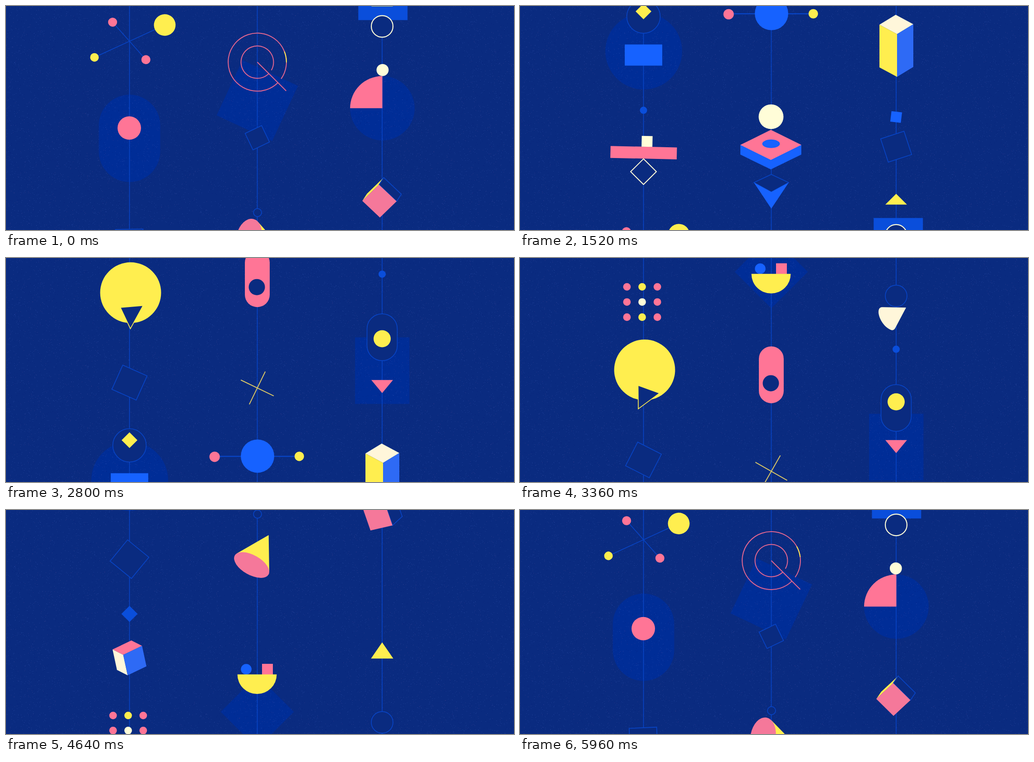
Animation of 1125 by 498 pixels, one loop 6000 ms. Source, as an HTML page with a canvas:

```html
<!DOCTYPE html>
<html lang="en">
<head>
<meta charset="utf-8">
<title>Drifting shapes</title>
<style>
html, body { margin: 0; width: 100%; height: 100%; overflow: hidden; background: #0a2b80; }
svg, canvas { position: absolute; left: 0; top: 0; width: 100%; height: 100%; display: block; }
</style>
</head>
<body>
<svg id="back" viewBox="0 0 1125 498"></svg>
<canvas id="grain" width="1125" height="498"></canvas>
<svg id="front" viewBox="0 0 1125 498"></svg>
<script>
const LOOP = 6000, V = 0.307;
const L = 273.5, M = 556.5, R = 833;
const BG = '#0a2b80', DEEP = '#002d97', WIRE = '#0844c4', MID = '#0a4edb', BLUE = '#1662ff';
const PINK = '#ff7596', YELLOW = '#ffee4f', CREAM = '#fffdd8', IVORY = '#fff6da', ROSE = '#e4668f';
const back = document.getElementById('back'), front = document.getElementById('front');
const items = [];

const clamp = (x, a = 0, b = 1) => Math.min(b, Math.max(a, x));
const mix = (a, b, u) => a.map((p, i) => p + (b[i] - p) * u);
const wave = (d, half) => Math.cos(Math.PI * d / half);
const ease = p => p < 0.5 ? 2 * p * p : 1 - 2 * (1 - p) * (1 - p);
const rad = a => a * Math.PI / 180;

// Markup helpers
const paint = (fill, stroke, w = 1.7) =>
  `fill="${fill}"` + (stroke ? ` stroke="${stroke}" stroke-width="${w}"` : '');
const disc = (x, y, r, fill, stroke, w) => `<circle cx="${x}" cy="${y}" r="${r}" ${paint(fill, stroke, w)}/>`;
const box = (x, y, w, h, fill, stroke, rx = 0) =>
  `<rect x="${x}" y="${y}" width="${w}" height="${h}" rx="${rx}" ${paint(fill, stroke)}/>`;
const square = (s, fill, stroke) => box(-s / 2, -s / 2, s, s, fill, stroke);
const poly = (pts, fill, stroke, w) => `<polygon points="${pts}" ${paint(fill, stroke, w)}/>`;
const diamond = (h, fill, stroke, w) => poly(`0,${-h} ${h},0 0,${h} ${-h},0`, fill, stroke, w);
const path = (d, fill = 'none', stroke, w) => `<path d="${d}" ${paint(fill, stroke, w)}/>`;
const arc = (r, a, b) => {
  const p = q => `${(r * Math.cos(rad(q))).toFixed(2)} ${(r * Math.sin(rad(q))).toFixed(2)}`;
  return `M${p(a)}A${r} ${r} 0 ${b - a > 180 ? 1 : 0} 1 ${p(b)}`;
};

// An item sits at height y at time t and drifts down at speed v.
// pose(kids, d) changes its parts, d being the time since t.
function add(layer, x, t, y, v, html, { rot = 0, spin = 0, pose } = {}) {
  const el = document.createElementNS('http://www.w3.org/2000/svg', 'g');
  el.innerHTML = html;
  layer.append(el);
  items.push({ el, x, t, y, v, rot, spin, pose, kids: [...el.children] });
}

// A solid from three edges leaving its near corner: [x, ax, ay, bx, by, cx, cy]
function solid(t, y, v, from, to, span, fills, wire) {
  const html = fills.map((f, i) => poly('', f, i === wire ? WIRE : '')).join('');
  add(front, 0, t, y, v, html, { pose(kids, d) {
    const [x, ax, ay, bx, by, cx, cy] = mix(from, to, clamp(d / span, -0.3, 1.3));
    const face = (px, py, qx, qy) => `${x},0 ${x + px},${py} ${x + px + qx},${py + qy} ${x + qx},${qy}`;
    kids[0].setAttribute('points', face(ax, ay, cx, cy));
    kids[1].setAttribute('points', face(bx, by, cx, cy));
    kids[2].setAttribute('points', face(ax, ay, bx, by));
  } });
}

// Deep shapes behind the strings
add(back, L, 0, 294, d => d * (d < 0 ? 0.286 : 0.305), box(-68, -97, 136, 194, DEEP, '', 68));
add(back, L, 2200, 309, V, disc(0.5, 0, 85, DEEP));
add(back, M, 0, 210, 0.315, square(135.6, DEEP), { rot: 25, spin: -0.0105 });
add(back, M, 3360, 30.5, 0.3265, diamond(81, DEEP));
add(back, R, 0, 227, 0.3125, disc(0.5, 0, 71.5, DEEP));
add(back, R, 2200, 68, 0.3035, box(-60, -74, 120.5, 148, DEEP));
back.insertAdjacentHTML('beforeend', [L, M, R].map(x => path(`M${x} 0V498`, 'none', WIRE)).join(''));

// Left string
add(front, L, 0, 78, 0.3062,
  `<g>${path('M-86 0H86', 'none', WIRE) + disc(86, 0, 24, YELLOW) + disc(-85.5, 0, 9.5, YELLOW)}</g>` +
  `<g>${path('M-56 0H54', 'none', WIRE) + disc(-56.5, 0, 10, PINK) + disc(54.8, 0, 10, PINK)}</g>`,
  { pose([a, b], d) {
    const k = (1 - wave(d, 880)) / 2;
    a.setAttribute('transform', `rotate(${-24.8 + 3.2 * k})`);
    b.setAttribute('transform', `rotate(${48.5 - 2.6 * k})`);
  } });
add(front, L, 0, 294, d => d * (d < 0 ? 0.286 : 0.305), disc(-0.5, 0, 26, PINK), { pose([c], d) {
  c.setAttribute('cy', 38 * wave(d + 720, 1020));
} });
add(front, L, 880, 35, V, disc(0, 0, 8, MID));
add(front, L, 880, 171.5, V,
  diamond(28.5, BG, CREAM, 2) +
  `<g>${box(-73.5, -26.5, 147, 26.5, PINK) + box(-12, -50.5, 24, 24, CREAM)}</g>`,
  { pose([, g], d) {
    const k = wave(d, 1400);
    g.setAttribute('transform', `translate(0 -29) rotate(${9.7 * k})`);
    g.lastChild.setAttribute('x', 53.4 * k - 12);
  } });
add(front, L, 2200, 232, V,
  disc(0, 0, 37, BG, WIRE) + diamond(17.5, YELLOW) + box(-41.5, 62, 83, 47, BLUE),
  { pose(kids) { kids[1].setAttribute('transform', 'translate(0 -11.5)'); } });
add(front, L, 2200, 92.5, V, square(59, BG, WIRE), { rot: 21, spin: 0.0052 });
add(front, L, 3360, 248.5, 0.3066, disc(2.5, 0, 67.5, YELLOW));
add(front, L + 4, 3360, 306, 0.325, poly('-16,-23 31.5,-6 -15.5,29', BG, YELLOW), { spin: 0.044 });
add(front, L - 3, 3360, 97.5, 0.3066,
  [0, 1, 2, 3, 4, 5, 6, 7, 8].map(i => disc(0, 0, 8.4, i === 4 ? CREAM : i % 3 === 1 ? YELLOW : PINK)).join(''),
  { pose(kids, d) {
    const gap = 29.1 + 4.6 * wave(d, 680);
    kids.forEach((c, i) => {
      c.setAttribute('cx', (i % 3 - 1) * gap);
      c.setAttribute('cy', (Math.floor(i / 3) - 1) * gap);
    });
  } });
add(front, L, 4040, 46.5, 0.3069, diamond(18, MID));
solid(4040, 133, 0.3145, [247, 47, -20, 19, 47, -12, -4.5], [273, 36, -20, 0, 44, -36, -20], 1240,
  [PINK, IVORY, '#2e6af5']);
add(front, L, 5280, 305.5, V, square(61, BG, WIRE), { rot: -27.4, spin: 0.0365 });

// Middle string
add(front, M, 0, 292.5, 0.297, square(40.5, BG, WIRE), { rot: -25.5, spin: 0.0075 });
add(front, M, 0, 124.5, 0.3075,
  path(arc(64.5, 45, 395), 'none', ROSE, 2) + path(arc(36, 44, 390), 'none', ROSE, 2) +
  path('M0 0L64 64', 'none', ROSE, 2) + path('', 'none', YELLOW, 2) +
  path('', 'none', YELLOW, 2) + path('M0 0L7 7M51 51L64 64', 'none', '#ffc46e', 2),
  { pose(kids, d) {
    const a = -10.5 + d * (d < 0 ? 0.2 : 0.131), k = clamp((d - 500) / 380);
    kids[3].setAttribute('d', arc(64.5, a - 11, a + 11));
    kids[4].setAttribute('d', k ? arc(36, 30 - 50 * k, 30) + arc(36, 44, 44 + 36 * k) : '');
    kids[5].setAttribute('opacity', k);
  } });
add(front, M, 0, 459, 0.331, disc(0.5, 0, 9, BG, WIRE));
add(front, 0, 5280, 307, 0.289, poly('', YELLOW) + '<ellipse fill="#f5789a"/>', { pose([side, base], d) {
  const [x, turn, a, b, len] = mix([542, -36, 24, 43, 73], [538, 13, 28, 43, 66], clamp(d / 720, -0.5, 1.4));
  const tx = a * a / len, ty = b * Math.sqrt(1 - a * a / len / len);
  side.setAttribute('points', `${tx},${-ty} ${len},0 ${tx},${ty}`);
  base.setAttribute('rx', a);
  base.setAttribute('ry', b);
  for (const e of [side, base]) e.setAttribute('transform', `translate(${x} 0) rotate(${turn})`);
} });
add(front, M, 880, 181, 0.33,
  poly('-38.5,0 0,-18 38.5,0 0,21', BG, WIRE) + poly('-38.5,0 0,21 38.5,0 0,58', BLUE));
add(front, M - 1, 880, 84.5, 0.35,
  poly('-67.5,0 67.5,0 67.5,21.5 0,54.5 -67.5,21.5', BLUE) +
  poly('0,-33.5 67.5,0 0,33.5 -67.5,0', PINK) +
  `<ellipse cx="0.5" cy="-2.5" rx="19.5" ry="9.5" fill="${BLUE}"/>`);
add(front, M, 880, 18, 0.356, disc(-0.5, 0, 27.5, CREAM));
add(front, M, 2200, 242, 0.331,
  path('M-94 0H93', 'none', WIRE, 2.4) + disc(0.5, -0.5, 37, BLUE) +
  disc(-94.5, 1, 11.5, PINK) + disc(93, 0, 10.5, YELLOW));
add(front, M, 2200, 90, 0.331, path('M-40.5 0H40.5M0 -40.5V40.5', 'none', '#d9c665', 2),
  { rot: 21.8, spin: 0.0068 });
add(front, M, 3360, 196, 0.3816, box(-27.5, 0, 55, 126.5, PINK, '', 27.5) + disc(-1, 82, 18, BG));
add(front, M, 3360, 35, 0.258,
  disc(-24.5, -11.5, 11.8, BLUE) + box(10.5, -23.5, 24, 24, PINK) +
  path('M-44 0H43A43.5 43.5 0 0 1 -44 0Z', YELLOW));

// Right string
add(front, R, 0, 13.5, 0.3125, box(-54.5, -17.5, 109, 35, MID), { pose([r], d) {
  r.setAttribute('x', -52.8 + (d < 0 ? d * 0.02 : d * 0.002));
} });
add(front, R, 0, 0.5, 0.29, poly('0,-24 24,0 -24,0', YELLOW));
add(front, R, 0, 45, 0.3057, disc(0, 0, 24, BG, CREAM, 2.2));
add(front, R + 0.5, 0, 227, 0.3125, path('', PINK), { pose([p], d) {
  const n = Math.floor(d / 1000), part = d / 1000 - n;
  const a = 180 + 90 * (n + ease(clamp(part / 0.62)));
  p.setAttribute('d', arc(71.5, a, a + 90) + 'L0 0Z');
} });
// Ball rolls over the disc, then drops off its right side
add(front, 0, 0, 0, 0, disc(0, 0, 13.4, CREAM), { pose([c], d) {
  const roll = d < 0 ? 0.6 + 0.027 * d : 0.6 + 0.027 * d + 6.9e-5 * d * d, f = d - 680;
  const x = f < 0 ? R + 85 * Math.sin(rad(roll)) : 899 + Math.min(4.5, f * 0.025);
  const y = f < 0 ? 227 + 0.3125 * d - 85 * Math.cos(rad(roll)) : 385.5 + 0.45 * f + 0.0011 * f * f;
  c.setAttribute('cx', x);
  c.setAttribute('cy', y);
} });
solid(5280, 177, 0.3056, [835, -46, 17, 23, 49, 19, -19], [826, -37, 36, 39, 37, 10.5, -16], 720,
  [YELLOW, BG, '#f5789a'], 1);
add(front, R, 880, 47, 0.3117, square(23.5, BLUE), { rot: -2, spin: 0.0137 });
add(front, R, 880, 113, 0.3117, square(54.5, BG, WIRE), { rot: -14.5, spin: -0.0057 });
const prism = [835, 36, -22, 0, 95, -39, -21];
solid(2200, 271, V, prism, prism, 1, [IVORY, YELLOW, '#2e6af5']);
add(front, R, 2200, 7.5, 0.2806, box(-33.5, -52, 67, 104, BG, WIRE, 33.5));
add(front, R, 2200, 29, 0.2504, disc(0, 0, 19, YELLOW));
add(front, R, 2200, 128, 0.2384, poly('-24,0 24,0 0,29', PINK));
add(front, R, 3360, 202.5, 0.298, disc(0, 0, 8, MID));
add(front, R, 3360, 84, 0.303, disc(0, 0, 24, BG, WIRE));
const sail = [22, -24.5, -2, 21, -6, 28, -13, 24.5, -30, 17, -43, -9, -38, -21, -36, -25.5, -31, -25.5];
const shell = [16.5, -22.5, 5, 19, 2, 26, -9, 25.8, -27, 24.5, -38, 9.5, -38, -7.5, -38, -24.5, -24, -25.8];
add(front, R, 3360, 134.5, 0.3107, path('', IVORY), { pose([p], d) {
  const q = mix(sail, shell, clamp(d / 680, -0.3, 1.3)).map(n => n.toFixed(2));
  const s = (i, j) => q.slice(i, j).join(' ');
  p.setAttribute('d', `M${s(0, 2)}L${s(2, 4)}Q${s(4, 8)}C${s(8, 14)}Q${s(14, 18)}Z`);
} });
add(front, R, 4040, 132, 0.33, poly('0,-36 24.7,0 -24.7,0', YELLOW));

// Fixed paper grain
const ink = document.getElementById('grain').getContext('2d');
let seed = 7;
const rnd = () => (seed = (Math.imul(seed, 1664525) + 1013904223) >>> 0) / 4294967296;
const specks = ['rgba(80,110,205,.3)', 'rgba(0,22,112,.4)', 'rgba(140,90,160,.28)'];
for (let i = 0; i < 15000; i++) {
  ink.fillStyle = specks[i % 7 ? i % 2 : 2];
  ink.fillRect(Math.floor(rnd() * 1125), Math.floor(rnd() * 498), 1, 1);
}

function draw(now) {
  const time = now % LOOP;
  for (const { el, x, t, y, v, rot, spin, pose, kids } of items) {
    const d = (time - t + LOOP * 1.5) % LOOP - LOOP / 2;
    const top = y + (typeof v === 'function' ? v(d) : v * d);
    el.setAttribute('transform', `translate(${x} ${top.toFixed(2)}) rotate(${(rot + spin * d).toFixed(2)})`);
    if (pose) pose(kids, d);
  }
}
const start = performance.now();
function tick() {
  draw(performance.now() - start);
  requestAnimationFrame(tick);
}
tick();
</script>
</body>
</html>
```
